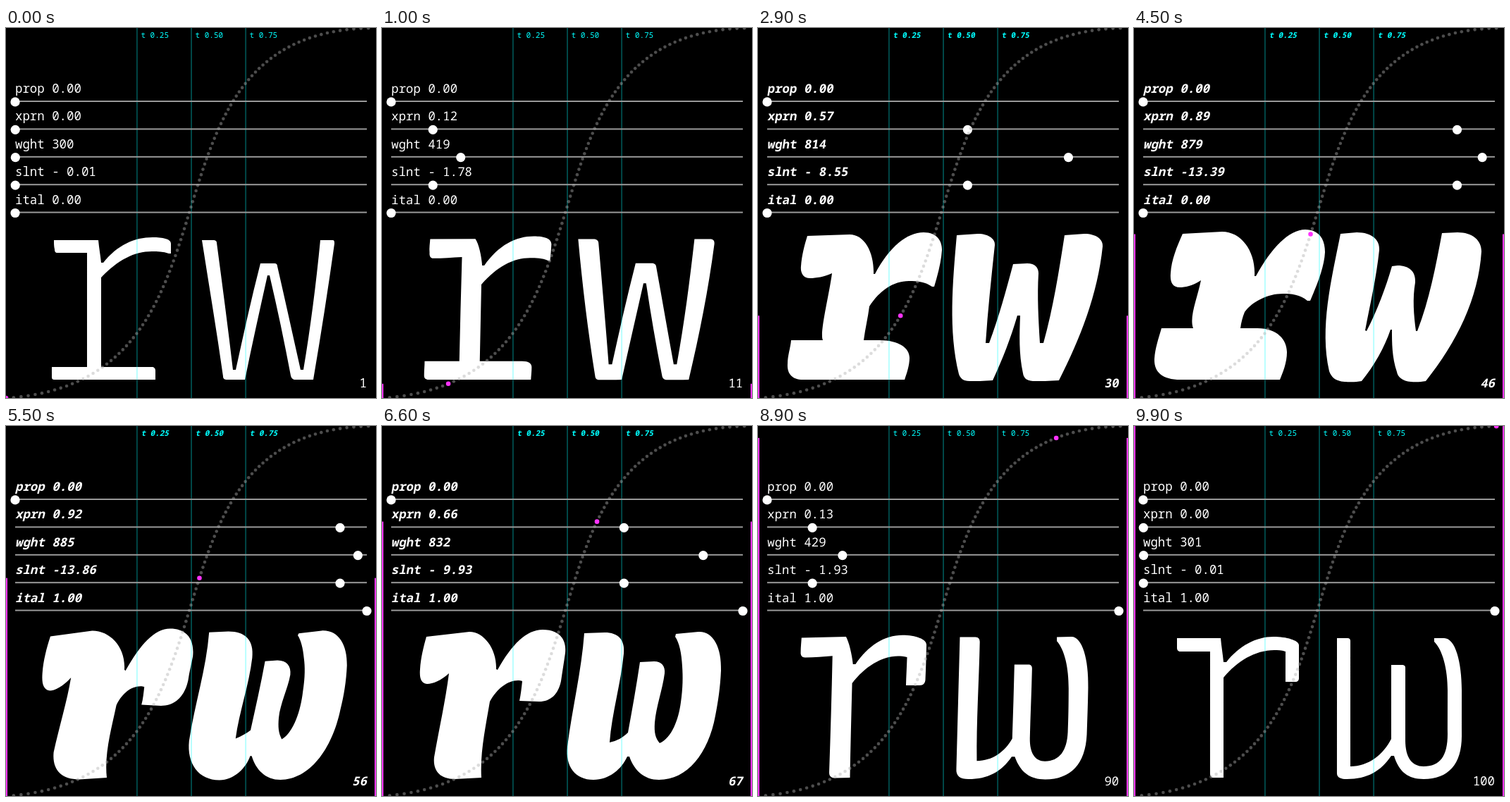
An HTML page that plays this animation: 525 by 525 pixels, repeating every 10 s.

```html
<!DOCTYPE html>
<html lang="en">
<head>
<meta charset="utf-8">
<title>rw</title>
<style>
html, body { margin: 0; width: 100%; height: 100%; overflow: hidden; background: #000; }
svg { display: block; width: 525px; height: 525px; }
text { font-family: "Noto Sans Mono", "DejaVu Sans Mono", monospace; white-space: pre; }
</style>
</head>
<body>
<svg id="stage" viewBox="0 0 525 525"></svg>
<script>
const SIZE = 525, STEP = 100, COUNT = 100;
const LEFT = 13, RIGHT = 512;
const stage = document.getElementById('stage');

// Outlines by style; every master of a glyph shares one path structure.
const roman = {
  at: [0, .3167, .57, .8928],
  tail: 1,
  r: [
    'M68 301 L131 301 C132 312 134 323 135 333 L138 333 C158 308 182 297 208 297 C222 297 234 299 234 306 C234 311 234 316 234 320 L231 320 C223 317 215 317 207 317 C182 317 159 329 135 354 C135 396 135 439 135 481 L207 481 C210 481 212 483 212 486 C212 490 212 495 212 499 L69 499 C66 499 65 498 65 495 C65 490 65 486 65 481 L115 481 C115 427 115 373 115 319 C101 319 87 319 73 319 C70 319 69 317 69 314 C68 310 68 305 68 301Z',
    'M69 297 L135 296 C146 296 153 322 154 344 L157 344 C178 308 203 293 228 293 C243 293 251 298 251 308 C250 321 248 335 246 348 L243 347 C234 342 225 342 215 342 C194 342 171 354 151 381 C149 407 147 433 145 459 L185 459 C205 459 213 465 213 473 C213 482 211 490 210 499 L62 499 C54 499 51 495 51 489 C51 479 53 469 53 459 L101 459 C104 418 107 377 111 335 C98 337 84 340 73 340 C66 340 64 334 65 326 C65 316 68 306 69 297Z',
    'M70 295 L130 293 C152 293 165 320 164 349 L166 349 C186 311 211 290 235 290 C252 290 261 300 261 315 C260 332 255 350 250 367 L247 367 C237 360 227 359 214 359 C192 359 172 373 158 395 C156 411 152 427 150 443 L172 443 C200 443 215 454 215 468 C215 479 211 490 208 499 L64 499 C47 499 41 489 42 476 C42 465 46 454 47 443 L92 443 C87 433 101 379 105 348 C94 353 82 355 74 355 C64 355 60 347 61 338 C62 323 66 308 70 295Z',
    'M69 292 L125 289 C153 289 173 318 171 352 L173 352 C195 312 220 286 243 286 C262 286 271 299 271 318 C270 340 259 366 250 387 L246 387 C236 378 223 377 211 377 C190 377 168 388 157 403 C154 410 152 418 151 426 L175 426 C204 426 217 443 217 460 C217 475 211 489 207 499 L66 499 C39 499 28 487 29 469 C30 454 35 440 39 426 L84 426 C78 410 90 383 95 358 C83 366 72 368 65 368 C54 368 51 360 52 348 C53 329 61 310 69 292Z'
  ],
  w: [
    'M278 301 L294 301 C297 301 299 302 299 305 C307 365 315 425 322 485 L326 485 C337 435 348 384 361 334 L381 334 C384 334 385 336 385 338 C396 386 407 436 418 485 L422 485 C432 425 440 363 446 301 L463 301 C466 301 466 303 466 306 C457 370 447 435 436 499 C427 499 418 499 411 499 C407 499 405 497 404 493 C395 445 385 398 374 351 L371 351 C360 400 349 450 339 499 C330 499 321 499 314 499 C310 499 308 498 308 494 C299 430 288 365 278 301Z',
    'M279 297 L309 297 C316 297 321 300 321 306 C321 360 321 412 321 464 L327 464 C337 420 347 376 358 333 L386 333 C392 333 396 336 396 341 C400 384 403 424 407 464 L412 464 C424 408 431 352 439 297 L470 297 C477 297 482 300 481 307 C473 374 456 437 434 499 C420 500 408 500 396 500 C389 500 386 497 386 492 C378 455 375 418 376 381 L371 381 C362 421 352 460 342 499 C327 500 315 500 303 500 C297 500 294 498 293 493 C281 430 278 364 279 297Z',
    'M282 294 L312 292 C328 292 337 300 336 308 C331 355 326 401 323 447 L328 447 C342 410 352 372 362 335 L382 334 C393 334 398 340 398 348 C396 381 398 414 400 447 L405 447 C419 397 427 345 435 294 L463 292 C480 292 490 300 489 310 C482 378 457 441 427 500 C413 501 401 501 390 501 C380 500 377 496 376 490 C370 462 371 435 372 408 L368 408 C359 439 347 470 333 500 C320 501 309 501 300 501 C291 501 287 497 285 491 C270 430 276 362 282 294Z',
    'M293 292 L316 290 C338 290 349 301 348 315 C344 354 335 392 328 429 L330 430 C345 401 357 369 366 338 L374 337 C391 337 400 346 399 361 C395 384 397 407 400 430 L402 430 C419 386 428 339 437 291 L459 290 C480 290 493 301 493 317 C489 383 458 446 414 501 C404 503 395 502 393 502 C381 501 374 495 373 488 C366 467 366 447 366 428 L364 428 C355 454 341 479 323 501 C313 503 303 502 299 502 C285 501 280 495 277 487 C263 425 280 358 293 292Z'
  ]
};

const italic = {
  at: [0, .3324, .662],
  tail: .5,
  r: [
    'M61 301 L123 301 C124 313 126 324 127 335 L131 335 C149 312 173 299 198 299 C216 299 234 304 234 311 C234 327 234 343 234 358 C234 361 232 363 229 363 L215 363 C215 349 215 334 215 320 C209 318 204 318 199 318 C172 318 146 334 127 357 C127 405 127 452 127 499 L113 499 C110 499 108 497 108 493 C108 435 108 378 108 320 C94 320 80 320 66 320 C63 320 61 318 61 315 C61 310 61 306 61 301Z',
    'M63 300 L128 296 C137 296 145 324 147 343 L150 343 C167 311 190 293 216 293 C236 293 248 300 247 310 C246 329 245 347 243 364 C242 372 238 376 231 376 L202 376 C203 365 205 352 206 341 C203 340 201 340 198 340 C181 340 160 354 144 378 C141 418 138 458 136 499 L101 500 C93 500 89 495 90 488 C95 437 99 386 102 336 C92 339 80 342 68 342 C61 342 59 337 60 330 C60 320 62 310 63 300Z',
    'M63 299 L124 292 C145 292 163 317 162 345 L164 346 C184 310 205 289 228 289 C250 289 262 301 260 322 C258 336 256 348 254 362 C250 381 239 391 223 391 L195 390 C197 381 198 371 199 362 C197 361 195 361 193 361 C178 361 163 373 153 391 C147 427 139 463 141 499 L103 501 C82 501 72 489 74 470 C81 430 90 390 95 351 C84 361 72 366 64 366 C55 365 53 357 54 345 C55 329 59 313 63 299Z'
  ],
  w: [
    'M288 301 L303 301 C306 301 307 303 307 305 C307 364 307 424 307 483 C333 483 354 466 365 444 C365 409 365 374 365 339 L381 339 C383 339 385 340 385 343 C385 378 385 412 385 446 C385 470 394 483 411 483 C434 483 445 469 445 437 C445 420 445 400 445 375 C445 345 438 318 426 306 L426 301 L440 301 C456 301 465 335 465 375 C465 397 465 418 465 440 C465 480 446 501 411 501 C389 501 376 491 369 468 L365 468 C350 490 331 501 302 501 C294 501 288 499 288 493 C288 429 288 365 288 301Z',
    'M284 297 L317 297 C324 297 327 302 327 308 C324 360 314 412 316 463 C331 463 344 457 354 443 C357 408 360 373 362 338 L388 338 C393 338 395 341 395 346 C393 378 389 408 387 438 C386 455 392 464 401 464 C418 464 428 448 431 430 C433 412 434 390 434 368 C434 340 431 318 421 304 L421 297 L452 296 C467 296 476 325 474 365 C473 388 471 411 469 434 C464 478 441 502 402 502 C382 502 367 493 357 471 L352 471 C338 492 318 501 293 501 C276 501 269 493 271 476 C275 416 280 356 284 297Z',
    'M287 294 L316 293 C335 293 345 303 343 323 C339 365 326 408 323 449 C333 447 342 442 349 435 C355 402 361 369 366 335 L386 334 C397 334 402 341 401 351 C398 374 389 398 387 421 C386 435 388 443 394 450 C411 443 421 416 424 392 C427 372 427 355 426 341 C425 322 422 308 416 299 L417 295 L449 292 C470 291 482 314 481 347 C480 370 477 391 473 411 C463 465 433 502 393 502 C372 502 358 489 351 469 L348 469 C340 487 322 502 300 502 C274 502 260 483 263 455 C270 400 283 348 287 294Z'
  ]
};

// Expression over the loop: [step, value]
const expression = [
  [0, .0004], [19, .3167], [29, .57], [45, .8928],
  [49.5, .98], [66, .662], [80, .3324], [99, .0007]
];

function secant(k) {
  const [a, b] = [expression[k], expression[k + 1]];
  return (b[1] - a[1]) / (b[0] - a[0]);
}

function tangent(k) {
  return k === 0 || k === expression.length - 1 ? 0 : (secant(k - 1) + secant(k)) / 2;
}

function expressionAt(step) {
  let k = 0;
  while (k < expression.length - 2 && step >= expression[k + 1][0]) k++;
  const [x0, y0] = expression[k], [x1, y1] = expression[k + 1];
  const h = x1 - x0, u = (step - x0) / h, v = 1 - u;
  return y0 * v * v * (1 + 2 * u) + y1 * u * u * (3 - 2 * u)
    + h * u * v * (tangent(k) * v - tangent(k + 1) * u);
}

function mixPaths(a, b, k) {
  const ends = b.match(/\d+/g);
  let n = 0;
  return a.replace(/\d+/g, v => (+v + (ends[n++] - v) * k).toFixed(2));
}

function outline(style, glyph, s) {
  const at = style.at;
  let m = 0;
  while (m < at.length - 2 && s > at[m + 1]) m++;
  let k = (s - at[m]) / (at[m + 1] - at[m]);
  if (k > 1) k = 1 + (k - 1) * style.tail;
  return mixPaths(style[glyph][m], style[glyph][m + 1], k);
}

function curve(t) {
  const v = 1 - t, a = 3 * v * v * t, b = 3 * v * t * t, c = t * t * t;
  return [SIZE * (.7 * a + .3 * b + c), SIZE * (1 - .043 * a - b - c)];
}

function set(el, attrs) {
  for (const key in attrs) el.setAttribute(key, attrs[key]);
  return el;
}

function add(tag, attrs) {
  return stage.appendChild(set(document.createElementNS('http://www.w3.org/2000/svg', tag), attrs));
}

const labels = [];
function addLabel(x, y, size, fill, content, anchor = 'start') {
  const el = add('text', { 'font-size': size, fill, 'text-anchor': anchor });
  el.textContent = content;
  labels.push({ el, x, y });
  return el;
}

const glyphs = { r: add('path', { fill: '#fff' }), w: add('path', { fill: '#fff' }) };

for (const t of [.25, .5, .75]) {
  const x = curve(t)[0];
  add('rect', { x: x - .5, y: 0, width: 2, height: SIZE, fill: '#0ff', opacity: .28 });
  addLabel(x + 6, 14, 11, '#0ff', 't ' + t.toFixed(2));
}

const sliders = [0, 1, 2, 3, 4].map(n => {
  const y = 104 + n * 39.4;
  add('rect', { x: LEFT, y: y - 1, width: RIGHT - LEFT, height: 2, fill: '#999' });
  return {
    knob: add('circle', { cy: y + .9, r: 6.6, fill: '#fff' }),
    text: addLabel(LEFT, y - 12, 17.4, '#fff', '')
  };
});
const counter = addLabel(RIGHT, 510, 17.4, '#fff', '', 'end');

for (let n = 0; n < COUNT; n++) {
  const [cx, cy] = curve(n / COUNT);
  add('circle', { cx, cy, r: 2.3, fill: '#afafaf', opacity: .44 });
}

const marker = add('circle', { r: 3.3, fill: '#f3f' });
const bars = [0, SIZE - 2].map(x => add('rect', { x, width: 2, fill: '#f3f' }));

function draw(step) {
  const s = expressionAt(step);
  const ital = step < COUNT / 2 ? 0 : 1;
  const weight = s < .5 ? 300 + 1000 * s : 700 + 200 * s;
  const slant = 15 * s;
  const style = ital ? italic : roman;

  for (const g in glyphs) glyphs[g].setAttribute('d', outline(style, g, s));

  const rows = [
    [0, 'prop 0.00'],
    [s, 'xprn ' + s.toFixed(2)],
    [(weight - 300) / 600, 'wght ' + Math.round(weight)],
    [s, 'slnt -' + slant.toFixed(2).padStart(5)],
    [ital, 'ital ' + ital.toFixed(2)]
  ];
  rows.forEach(([value, text], n) => {
    sliders[n].knob.setAttribute('cx', LEFT + value * (RIGHT - LEFT));
    sliders[n].text.textContent = text;
  });
  counter.textContent = step + 1;

  for (const { el, x, y } of labels) {
    set(el, { 'font-weight': Math.round(weight), transform: `translate(${x} ${y}) skewX(${-slant})` });
  }

  const [cx, cy] = curve(step / COUNT);
  set(marker, { cx, cy });
  for (const bar of bars) set(bar, { y: cy, height: SIZE - cy });
}

const start = performance.now();
let shown = -1;
function tick() {
  const step = Math.floor((performance.now() - start) / STEP) % COUNT;
  if (step !== shown) draw(shown = step);
  requestAnimationFrame(tick);
}
tick();
</script>
</body>
</html>
```
